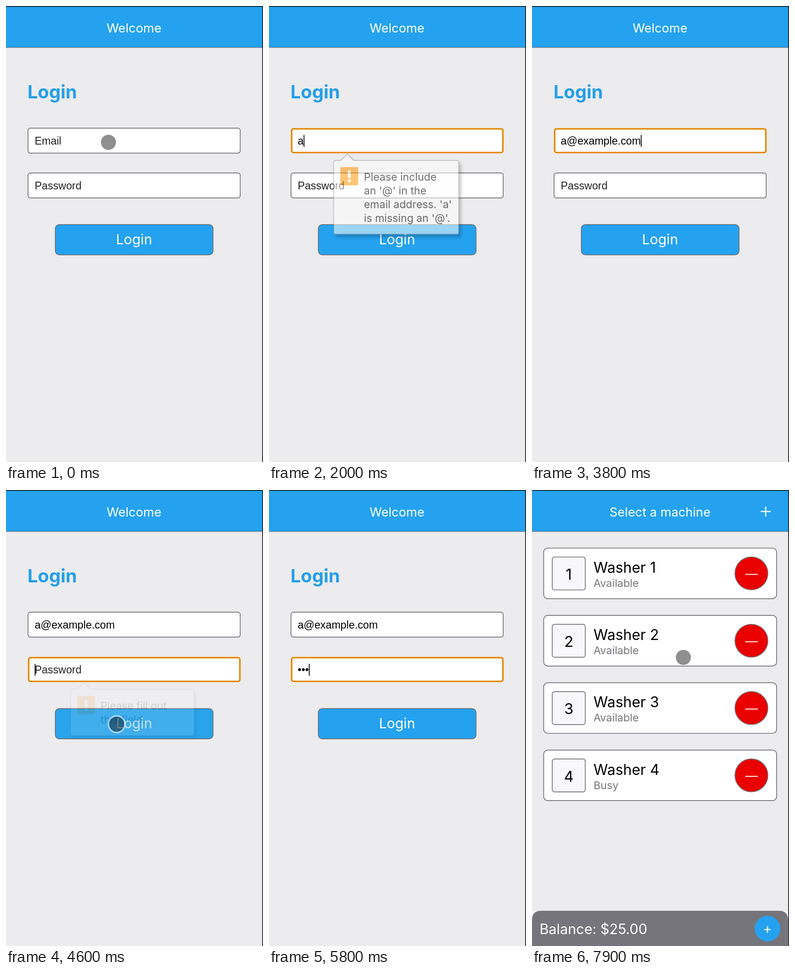
An HTML page that plays this animation: 562 px wide and 997 px high, repeating every 8000 ms.

```html
<!DOCTYPE html>
<html lang="en">
<head>
<meta charset="utf-8">
<title>Login flow</title>
<style>
  html, body { margin: 0; width: 100%; height: 100%; overflow: hidden; background: #ecebed; }
  svg { display: block; width: 100vw; height: 100vh; }
  text { font-family: Inter, sans-serif; }
  .input { font: 23.3px "Liberation Sans", Arial, sans-serif; }
  .edge { stroke: #707075; stroke-width: 1.7; }
</style>
</head>
<body>
<svg id="stage" viewBox="0 0 562 997" preserveAspectRatio="none"></svg>
<script>
const LOOP = 8000, STEP = 100;
const BLUE = '#24a2ef';
const EMAIL = 'a@example.com';
const EMAIL_KEYS = [1600, 2500, 2600, 2700, 2800, 2900, 3100, 3300, 3400, 3500, 3550, 3600, 3800];
const PASSWORD_KEYS = [5600, 5700, 5800, 5900, 5950, 6000, 6100, 6200, 6300, 6350, 6400, 6500, 6600];
const EMAIL_FOCUS = 800, PASSWORD_FOCUS = 4600, PAGE_CHANGE = 7500;

// Pointer sessions: [time, x, y]; the pointer hides while typing.
const POINTER = [
  [[0, 224, 298], [200, 224, 298], [700, 254, 510], [1599, 254, 510]],
  [[4000, 254, 510], [4400, 242, 512], [5599, 242, 512]],
  [[6800, 242, 512], [7100, 249, 490], [7300, 254, 505], [7500, 254, 505], [7900, 331, 366], [8000, 331, 366]],
];
const PRESSES = [[800, 1000], [4500, 4800], [7300, 7500]];
const FILL_OUT = ['Please fill out', 'this field.'];
const BUBBLES = [
  { from: 850, to: 1600, y: 324, lines: FILL_OUT },
  { from: 1750, to: 2500, y: 324, lines: ['Please include', "an '@' in the", "email address. 'a'", "is missing an '@'."] },
  { from: 4550, to: 5600, y: 422, lines: FILL_OUT },
];

const stage = document.getElementById('stage');
const ruler = document.createElement('canvas').getContext('2d');
ruler.font = '23.3px "Liberation Sans", Arial, sans-serif';

const clamp = v => Math.max(0, Math.min(1, v));
const ease = v => v * v * (3 - 2 * v);
const within = (t, [from, to]) => t >= from && t < to;

const rect = (x, y, w, h, r, fill, extra = '') =>
  `<rect x="${x}" y="${y}" width="${w}" height="${h}" rx="${r}" fill="${fill}" ${extra}/>`;
const circle = (x, y, r, fill, extra = '') =>
  `<circle cx="${x}" cy="${y}" r="${r}" fill="${fill}" ${extra}/>`;
const path = (d, stroke, width) =>
  `<path d="${d}" fill="none" stroke="${stroke}" stroke-width="${width}"/>`;
const text = (x, y, size, fill, content, extra = '') =>
  `<text x="${x}" y="${y}" font-size="${size}" fill="${fill}" ${extra}>${content}</text>`;
const CENTER = 'text-anchor="middle"';
const EDGE = 'class="edge"';
const plus = (x, y, arm, width) =>
  path(`M${x - arm} ${y}h${2 * arm}M${x} ${y - arm}v${2 * arm}`, '#fff', width);

function header(title) {
  return rect(0, 0, 562, 997, 0, '#ecebed') + rect(0, 0, 562, 90, 0, BLUE) +
    path('M0 90.5H562', '#55708a', 1.3) + text(280, 57.5, 27.3, '#fff', title, CENTER);
}

function field(y, value, placeholder, focused, lastInput, t) {
  let out = focused
    ? rect(47, y - 1, 467, 57, 6, '#fff') +
      rect(49.5, y + 1.5, 462, 52, 4, '#fff', 'stroke="#e28a0c" stroke-width="3.6"')
    : rect(48.2, y + .2, 464, 54.4, 5, '#fff', EDGE);
  out += text(62.8, y + 36, 23.3, value ? '#000' : '#222', value || placeholder, 'class="input"');
  if (focused && Math.floor((t - lastInput) / 500) % 2 === 0) {
    const x = 63.6 + ruler.measureText(value).width;
    out += path(`M${x} ${y + 15}v26`, '#000', 1.8);
  }
  return out;
}

function bubbleOpacity({ from, to }, t) {
  return Math.min(clamp((t - from) / 450), clamp(1 - (t - to) / 200));
}

function bubble(item, t) {
  const alpha = bubbleOpacity(item, t);
  if (!alpha) return '';
  const { y, lines } = item;
  const bottom = y + 55 + 30 * lines.length;
  const shape = `M145.5 ${y + 13.5}H157.5L171.5 ${y}L185.5 ${y + 13.5}H414.5q4 0 4 4` +
    `V${bottom - 4}q0 4 -4 4H145.5q-4 0 -4 -4V${y + 17.5}q0 -4 4 -4z`;
  return `<g opacity="${alpha}" transform="translate(141 0) scale(${.97 + .03 * alpha} 1) translate(-141 0)">
    <path d="${shape}" fill="#fff" fill-opacity=".98" stroke="#858585" stroke-width="1.3" filter="url(#shadow)"/>
    ${rect(156, y + 28, 40, 40, 3, '#ff9a0e')}
    ${rect(173, y + 36, 6, 16, 1, '#fff')}${rect(173, y + 55, 6, 6, 1, '#fff')}
    ${lines.map((line, i) => text(208.5, y + 58 + 30 * i, 23.5, '#000', line)).join('')}
  </g>`;
}

function loginPage(t) {
  const typed = EMAIL_KEYS.filter(k => k <= t);
  const dots = PASSWORD_KEYS.filter(k => k <= t);
  const onEmail = t >= EMAIL_FOCUS && t < PASSWORD_FOCUS;
  const pressed = PRESSES.some(p => within(t, p));
  return header('Welcome') +
    text(47, 202, 40, '#249fe8', 'Login', 'font-weight="700"') +
    field(267, EMAIL.slice(0, typed.length), 'Email', onEmail, typed.at(-1) ?? EMAIL_FOCUS, t) +
    field(365, '•'.repeat(dots.length), 'Password', t >= PASSWORD_FOCUS, dots.at(-1) ?? PASSWORD_FOCUS, t) +
    rect(107.8, 477.8, 345, 66.4, 9, pressed ? '#29a3ea' : BLUE, EDGE) +
    text(280, 521, 30.3, '#fff', 'Login', `${CENTER} opacity="${pressed ? .68 : 1}"`) +
    BUBBLES.map(b => bubble(b, t)).join('');
}

function machineCard(n) {
  const y = 127 + 147.2 * (n - 1);
  return rect(25.5, y, 509.5, 110.6, 9, '#fff', EDGE) +
    rect(44.3, y + 19.5, 72.2, 72, 5, '#f8f7fb', EDGE) +
    text(80.5, y + 69, 33, '#000', n, CENTER) +
    text(134.5, y + 54, 32, '#000', 'Washer ' + n) +
    text(134.5, y + 85, 23.4, '#77777b', n < 4 ? 'Available' : 'Busy') +
    circle(479.8, y + 55.3, 36, '#eb0000', EDGE) +
    path(`M466 ${y + 57.5}h28`, '#fff', 2);
}

function machinePage() {
  return header('Select a machine') + plus(511, 47, 11, 2.6) +
    [1, 2, 3, 4].map(machineCard).join('') +
    rect(0, 921, 562, 76, 0, '#fafafa') +
    `<path d="M0 997V940q0 -20 20 -20H540q20 0 20 20V997z" fill="#75757b"/>` +
    text(16.5, 971, 30.7, '#fff', 'Balance: $25.00') +
    circle(515, 959, 28, BLUE) + plus(515, 961, 7, 2.4);
}

function pointer(t) {
  const track = POINTER.find(p => t >= p[0][0] && t <= p.at(-1)[0]);
  if (!track) return '';
  const i = Math.max(1, track.findIndex(k => k[0] >= t));
  const [t0, x0, y0] = track[i - 1], [t1, x1, y1] = track[i];
  const k = ease(clamp((t - t0) / (t1 - t0)));
  const x = x0 + (x1 - x0) * k, y = y0 + (y1 - y0) * k;
  const covered = bubbleOpacity(BUBBLES[2], t) > .3;
  const hover = y > 477 && t < PAGE_CHANGE && !covered;
  return circle(x, y, 16.5, 'rgba(0,0,0,.44)') +
    (hover ? circle(x, y, 18.2, 'none', 'stroke="#fff" stroke-opacity=".5" stroke-width="3.4"') : '');
}

const SHADOW = `<defs><filter id="shadow" x="-10%" y="-10%" width="125%" height="130%">
  <feDropShadow dx="5" dy="6" stdDeviation="3.5" flood-color="#000" flood-opacity=".38"/></filter></defs>`;
const FRAME = rect(0, 0, 562, 1.8, 0, '#1d2025') + rect(560.3, 0, 1.7, 997, 0, '#1d2025');

let shown = -1;
function draw() {
  const t = Math.floor(performance.now() % LOOP / STEP) * STEP;
  if (t !== shown) {
    shown = t;
    stage.innerHTML = SHADOW + (t < PAGE_CHANGE ? loginPage(t) : machinePage()) + pointer(t) + FRAME;
  }
  requestAnimationFrame(draw);
}
draw();
</script>
</body>
</html>
```
